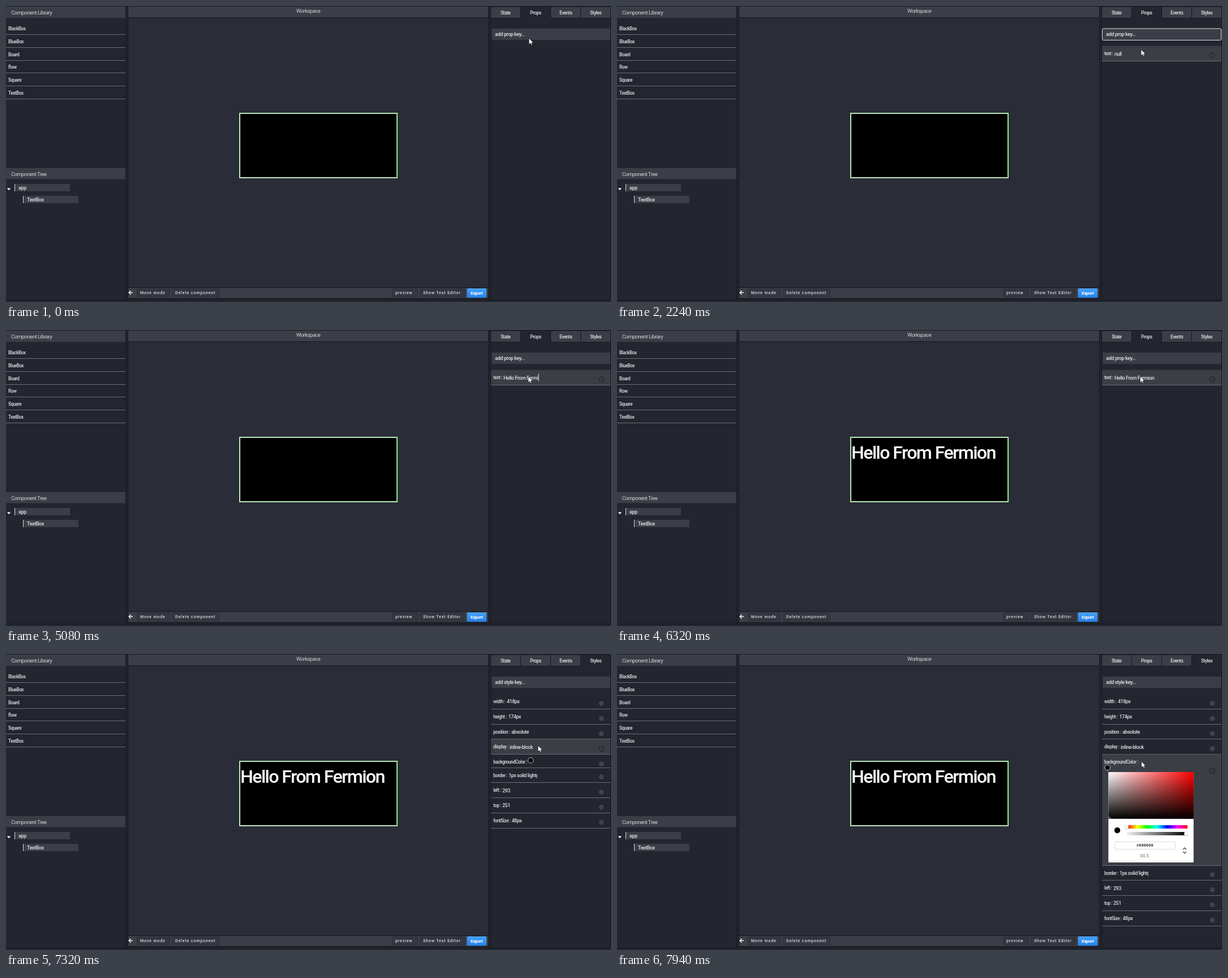
An HTML page for the animation above (8000 ms loop, 1069 by 524 pixels).

```html
<!DOCTYPE html>
<html lang="en">
<head>
<meta charset="utf-8">
<title>Component props editor</title>
<style>
html, body { margin: 0; width: 100%; height: 100%; overflow: hidden; background: #23252f; }
svg { display: block; }
text { font-family: Roboto, "Open Sans", sans-serif; font-weight: 500; letter-spacing: -.05em; fill: #e0e1e4; white-space: pre; }
.title { font-weight: 400; fill: #d3d5da; }
.btn { letter-spacing: .88px; }
.hex { font-family: "Liberation Mono", monospace; font-weight: 700; letter-spacing: 0; fill: #333; }
.unit { font-family: "Liberation Serif", serif; font-weight: 400; letter-spacing: 0; fill: #777; }
</style>
</head>
<body>
<svg id="stage" width="1069" height="524" viewBox="0 0 1069 524">
  <defs>
    <linearGradient id="blue" x2="0" y2="1"><stop stop-color="#45a3fc"/><stop offset="1" stop-color="#2480e6"/></linearGradient>
    <linearGradient id="sat"><stop stop-color="#fff"/><stop offset="1" stop-color="#f00"/></linearGradient>
    <linearGradient id="dark" x2="0" y2="1"><stop stop-opacity="0"/><stop offset="1"/></linearGradient>
    <linearGradient id="alpha"><stop stop-opacity="0"/><stop offset="1"/></linearGradient>
    <linearGradient id="hue"></linearGradient>
    <pattern id="check" width="4" height="4" patternUnits="userSpaceOnUse">
      <path d="M0 0h2v4h2v-2h-4z" fill="#ddd"/>
    </pattern>
  </defs>
  <g id="base"></g>
  <g id="live"></g>
  <path id="cursor" d="M0 0V11L2.6 8.6 4.3 12.3 6.1 11.5 4.5 8H7.8Z" fill="#fff" stroke="#15161b" stroke-width=".7"/>
</svg>
<script>
const $ = id => document.getElementById(id);
const BAR = '#3b3e46', PANEL = '#23252f', EDGE = '#16171d', RULE = '#6c6f77';

const rect = (x, y, w, h, fill, more = '') =>
  `<rect x="${x}" y="${y}" width="${w}" height="${h}" fill="${fill}" ${more}/>`;
const text = (x, y, size, str, more = '') =>
  `<text x="${x}" y="${y}" font-size="${size}" ${more}>${str}</text>`;
const dot = (x, y, r, fill, more = '') =>
  `<circle cx="${x}" cy="${y}" r="${r}" fill="${fill}" ${more}/>`;
const path = (d, stroke, w = 1) =>
  `<path d="${d}" fill="none" stroke="${stroke}" stroke-width="${w}"/>`;

function button(x, w, tx, label) {
  return rect(x + .5, 500.5, w - 1, 14.5, '#343740', 'rx="1.5" stroke="#2d3039"') +
    text(tx, 510.3, 7, label, 'class="btn"');
}

function treeNode(x, y, label) {
  return rect(x, y, 98, 13, BAR) + rect(x, y, 1, 13, '#d8d9dc') + text(x + 7, y + 9.7, 9.1, label);
}

function drawBase() {
  let s = rect(0, 0, 1069, 524, PANEL) + rect(0, 0, 1069, 1, EDGE);
  // Left column
  s += rect(0, 1, 211, 20, BAR) + text(9, 15, 9.5, 'Component Library', 'class="title"');
  ['BlackBox', 'BlueBox', 'Board', 'Row', 'Square', 'TextBox'].forEach((name, i) => {
    const y = 43 + i * 22.75;
    s += text(4, y, 8.15, name) + rect(0, Math.round(y + 7), 211, 1, RULE);
  });
  s += rect(0, 287, 211, 19.5, BAR) + text(9, 300.5, 9.4, 'Component Tree', 'class="title"');
  s += treeNode(15, 315, 'app') + treeNode(30, 336, 'TextBox');
  s += '<path d="M1.8 322.5H8.2L5 326.2Z" fill="#fff"/>';
  s += rect(211, 1, 1, 520, EDGE);
  // Workspace
  s += rect(215, 1, 638, 517, EDGE) + rect(216, 1, 636, 516, '#2a2d37') +
    rect(216, 1, 636, 19, BAR) + rect(216, 20, 636, 1, EDGE) +
    text(513, 12.2, 9.35, 'Workspace', 'class="title"');
  s += rect(216, 498, 636, 1, EDGE) + rect(216, 499, 636, 18, BAR);
  s += path('M224 507.3H217.5M220.5 504L217.2 507.3L220.5 510.6', '#f0f0f0', 1.5);
  s += button(231, 58, 237, 'Move mode') + button(293, 84, 299, 'Delete component') +
    button(682, 46, 688, 'preview') + button(731, 80, 737, 'Show Text Editor');
  s += rect(814.5, 500, 34.5, 16.5, 'url(#blue)', 'rx="1.5"') +
    text(821, 511, 8.1, 'Export', 'style="font-weight:700;fill:#fff"');
  s += rect(412, 189, 280, 116, '#b9e8b7') + rect(690, 189, 2, 116, '#90ee90') +
    rect(414, 191, 276, 112, '#000');
  // Frame of the right column
  s += rect(856, 1, 1, 520, EDGE) + rect(1068, 1, 1, 520, EDGE) + rect(0, 520, 1069, 1, EDGE);
  $('base').innerHTML = s;
  $('hue').innerHTML = [0, 1, 2, 3, 4, 5, 6].map(i =>
    `<stop offset="${i / 6}" stop-color="hsl(${i * 60},100%,50%)"/>`).join('');
}

function drawTabs(active, hover) {
  return [['State', 874], ['Props', 926], ['Events', 978], ['Styles', 1032]].map(([name, x], i) => {
    const left = 857 + i * 53, on = name === active;
    return rect(left, 2, 52, 19, on ? PANEL : BAR) + rect(left + 52, 2, 1, 19, EDGE) +
      (on ? '' : rect(left, 21, 52, 1, EDGE)) +
      text(x, 15, 8.3, name, name === hover ? 'style="fill:#a2a4aa"' : '');
  }).join('');
}

function drawField(state) {
  const box = state.focus
    ? rect(857.5, 40, 210, 20.5, BAR, 'rx="2" stroke="#e6e7ea"')
    : rect(858, 40, 209.5, 20, BAR, 'stroke="#30333b" stroke-width=".6"');
  const hint = state.tab === 'Props' ? 'add prop key...' : 'add style key...';
  return box + text(864, 53, 9.1, state.key || hint, state.key ? 'class="typed"' : '');
}

// One "key : value" line; top is the rule above it.
function drawRow(top, h, key, x, value, hot) {
  const y = top + 16.5;
  let s = hot ? rect(857, top, 211, h, '#3b3e45') : '';
  s += rect(857, Math.round(top + h - .5), 211, 1, RULE);
  s += text(861, y, 8.15, key + ' :');
  s += hot
    ? text(x, y + .3, 8.9, value, 'class="value"')
    : `<svg x="${x}" y="${top}" width="51" height="26">${text(0, 16.8, 8.9, value)}</svg>`;
  return s + drawToggle(h > 100 ? top + 29 : top + 16.7, hot);
}

function drawToggle(y, hot) {
  return hot ? dot(1052, y, 4.7, '#383b43', 'stroke="#1d1f27"') : dot(1052, y, 4.4, '#41444b');
}

function drawPicker() {
  let s = rect(868.3, 209, 150.5, 160, '#fff', 'rx="1.5"');
  s += rect(868.3, 209, 150.5, 82.7, 'url(#sat)') + rect(868.3, 209, 150.5, 82.7, 'url(#dark)');
  s += path('M868 289A3 3 0 0 1 872 292', '#fff', .8);
  s += dot(884, 312, 5.2, '#000');
  s += rect(901, 303, 107, 6, 'url(#hue)');
  s += rect(901, 315, 107, 6, 'url(#check)') + rect(901, 315, 107, 6, 'url(#alpha)');
  s += [[900, 306], [1006, 318]].map(p =>
    dot(p[0], p[1] + .6, 4.1, '#0004') + dot(p[0], p[1], 3.9, '#f8f8f8')).join('');
  s += rect(879.5, 332.5, 107, 13, '#fff', 'rx="1" stroke="#dadada"');
  s += text(918, 341.4, 7, '#000000', 'class="hex"') + text(924, 360, 8, 'HEX', 'class="unit"');
  return s + path('M1000.3 346L1003 343.2L1005.7 346M1000.3 350L1003 352.8L1005.7 350', '#333', 1.2);
}

const STYLES = [
  ['width', 885, '418px'], ['height', 887.5, '174px'], ['position', 893, 'absolute'],
  ['display', 890, 'inline-block'], ['backgroundColor', 922, ''], ['border', 888, '1px solid lightgreen'],
  ['left', 877, '293'], ['top', 877, '251'], ['fontSize', 893.5, '48px']
];

function drawStyles(state) {
  let top = 70.7, s = '';
  for (const [key, x, value] of STYLES) {
    const color = key === 'backgroundColor';
    const h = !color ? 26.75 : state.open ? 196.3 : 23.3;
    s += drawRow(top, h, key, x, value, state.hot === key);
    if (color) s += state.open
      ? dot(866.7, 201, 4.8, '#000', 'stroke="#ddd" stroke-width=".9"') + drawPicker()
      : dot(927, 188.3, 4.8, '#000', 'stroke="#ddd" stroke-width=".9"');
    top += h;
  }
  return s;
}

function addCaret(cls, y, h) {
  const el = $('live').querySelector('.' + cls);
  if (!el) return;
  const x = +el.getAttribute('x') + (el.textContent ? el.getComputedTextLength() : 0) + .4;
  $('live').insertAdjacentHTML('beforeend', rect(x, y, .9, h, '#f2f2f2'));
}

// Each entry changes part of the state and holds until the next.
const STEPS = [
  [0, { tab: 'Props', at: [924, 57] }],
  [200, { focus: true, at: [925, 56.6] }],
  [830, { key: 'te' }],
  [1030, { key: 'tex' }],
  [1220, { key: 'text' }],
  [1420, { key: '', prop: 'null' }],
  [2240, { hot: 'text', at: [926, 77] }],
  [2440, { focus: false, caret: true, at: [923, 81] }],
  [2640, { prop: '', at: [922.7, 82] }],
  [3060, { prop: 'H' }],
  [3260, { prop: 'He' }],
  [3460, { prop: 'Hell' }],
  [3660, { prop: 'Hello' }],
  [3860, { prop: 'Hello ' }],
  [4060, { prop: 'Hello F' }],
  [4280, { prop: 'Hello Fr' }],
  [4480, { prop: 'Hello From' }],
  [4680, { prop: 'Hello From ' }],
  [4880, { prop: 'Hello From Fe' }],
  [5080, { prop: 'Hello From Fermi' }],
  [5300, { prop: 'Hello From Fermion' }],
  [5700, { caret: false, shown: 'Hello From Fermion' }],
  [6320, { at: [924.3, 82] }],
  [6520, { hot: '', at: [948, 66] }],
  [6720, { at: [1012, 27] }],
  [6920, { hot: 'Styles', at: [1037, 10] }],
  [7120, { tab: 'Styles' }],
  [7320, { hot: 'display', at: [940, 162] }],
  [7540, { hot: 'backgroundColor', at: [928, 181] }],
  [7740, { at: [926.5, 185] }],
  [7940, { open: true, at: [926.5, 190] }]
];

let last = -1;
function render(t) {
  const n = STEPS.filter(step => step[0] <= t).length;
  if (n === last) return;
  last = n;
  const state = Object.assign({}, ...STEPS.slice(0, n).map(step => step[1]));
  let s = drawTabs(state.tab, state.tab === 'Props' ? state.hot : '') + drawField(state);
  if (state.tab === 'Styles') s += drawStyles(state);
  else if (state.prop !== undefined) s += drawRow(70.7, 26.75, 'text', 879, state.prop, state.hot === 'text');
  if (state.shown) s += text(414, 227.7, 32.2, state.shown, 'style="fill:#fff"');
  $('live').innerHTML = s;
  if (state.key) addCaret('typed', 44, 12);
  if (state.caret) addCaret('value', 77.5, 13);
  $('cursor').setAttribute('transform', `translate(${state.at})`);
}

function tick() {
  render(performance.now() % 8000);
  requestAnimationFrame(tick);
}

drawBase();
render(0);
requestAnimationFrame(tick);
</script>
</body>
</html>
```
